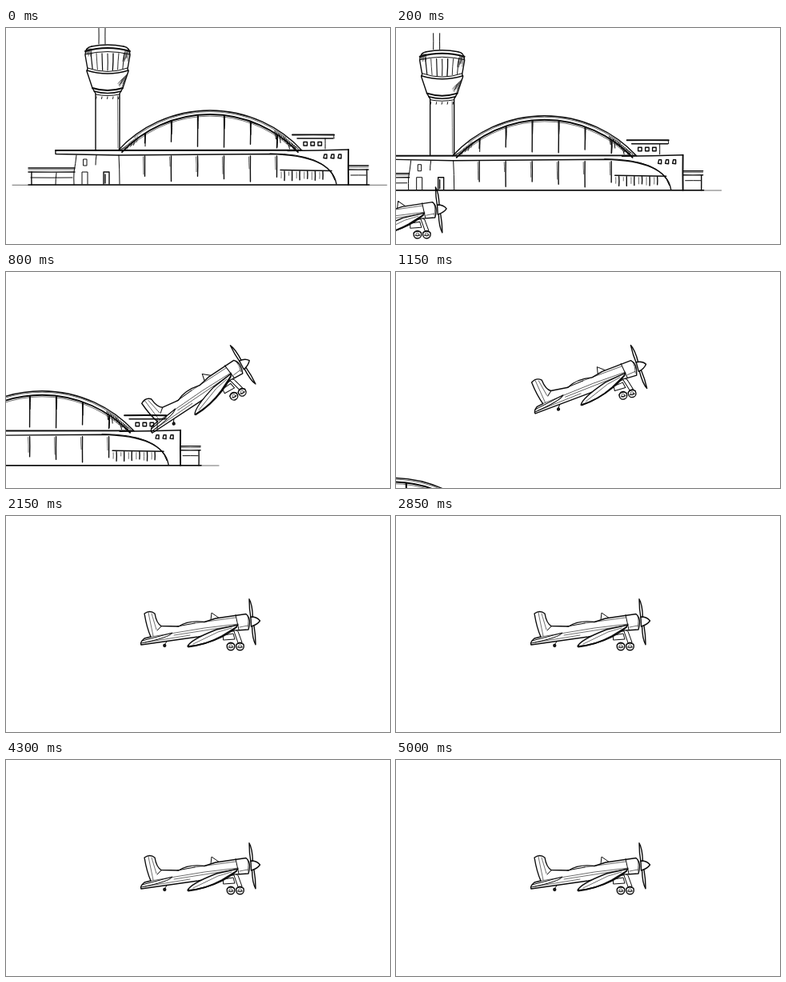
An HTML page that plays this animation: 480 by 270 pixels, repeating every 5.05 s.

```html
<!DOCTYPE html>
<html lang="en">
<head>
<meta charset="utf-8">
<title>Plane taking off</title>
<style>
  html, body { margin: 0; width: 100%; height: 100%; overflow: hidden; background: #fff; }
  svg { display: block; width: 100%; height: 100%; }
  path, circle { fill: none; stroke: #0c0c0c; stroke-linecap: round; stroke-linejoin: round; }
  .skin { fill: #fff; }
  #plane { mix-blend-mode: multiply; }
</style>
</head>
<body>
<svg viewBox="0 0 480 270">
  <g id="airport"></g>
  <g id="plane"></g>
</svg>
<script>
const LOOP = 5050, STEP = 50;
const FINE = 0.6, THIN = 1, MID = 1.4, BOLD = 1.9;
const airport = document.getElementById('airport');
const plane = document.getElementById('plane');

let seed = 7;
function rand(a, b) {
  seed = seed * 16807 % 2147483647;
  return a + (b - a) * seed / 2147483647;
}

function add(parent, tag, attrs) {
  const node = document.createElementNS('http://www.w3.org/2000/svg', tag);
  for (const key in attrs) node.setAttribute(key, attrs[key]);
  parent.append(node);
}
const ink = (d, width = THIN) => add(airport, 'path', { d, 'stroke-width': width });
const draft = (d, width = FINE) => add(plane, 'path', { d, 'stroke-width': width });
const panel = (d, width = MID) => add(plane, 'path', { d, 'stroke-width': width, class: 'skin' });

// A slightly bent hand-drawn line.
function line(x1, y1, x2, y2, width) {
  const mx = (x1 + x2) / 2 + rand(-0.6, 0.6), my = (y1 + y2) / 2 + rand(-0.4, 0.4);
  ink(`M${x1} ${y1}Q${mx} ${my} ${x2} ${y2}`, width);
}

function drawTower() {
  const cx = 127;
  const ring = (y, half, sag, width) => ink(`M${cx - half} ${y}q${half} ${sag} ${2 * half} 0`, width);
  for (const x of [116, 124]) line(x, 0, x, 20);
  for (const side of [-1, 1]) {
    const x = half => cx + side * half;
    ink(`M${x(20)} 23Q${x(28)} 24 ${x(28)} 34L${x(25)} 51L${x(26)} 54L${x(19)} 75L${x(15)} 82V152`, MID);
  }
  ring(23, 20, -4, MID);
  ring(29, 28, -8, BOLD);
  ring(33, 28, -7);
  ring(50, 25, 9);
  ring(53, 26, 8, MID);
  ring(75, 19, 6, BOLD);
  ring(79, 17, 5, MID);
  ring(83, 15, 3);
  for (let k = -3; k <= 3; k++) {
    const x = cx + 7 * k;
    line(x, 32 - k * k / 9, cx + 6.3 * k, 53 - k * k / 4, rand(FINE, MID));
    if (k < 2) line(x + 7, 86, x + 6.5, 88.5);
  }
  for (let i = 0; i < 7; i++) {
    line(154 - i, 27 + rand(0, 5), 152 - i, rand(34, 44), FINE);
    line(151 - i, 58 + i, 146 - i, rand(68, 74), FINE);
    line(101 + i, 26, 101 + i, rand(29, 36), FINE);
  }
  line(139.5, 85, 140, 150, FINE);
}

function drawDome() {
  const cx = 255, top = 103, radius = 157;
  const arch = x => top + radius - Math.sqrt(radius ** 2 - (x - cx) ** 2);
  const arc = (inset, half, width) => {
    const r = radius - inset, y = top + radius - Math.sqrt(r * r - half * half);
    ink(`M${cx - half} ${y}A${r} ${r} 0 0 1 ${cx + half} ${y}`, width);
  };
  arc(0, 115, MID);
  arc(1.5, 95, FINE);
  arc(5, 110, BOLD);
  arc(7, 100, FINE);
  for (let i = 0; i < 6; i++) {
    const x = 173.5 + 33 * i, y = arch(x) + 6;
    line(x, y, x, rand(142, 150), MID);
    line(x + 1, y, x + 0.5, y + 16, THIN);
    line(x, 160, x, rand(184, 195), MID);
    line(x - 2, 161, x - 1.5, rand(170, 184), FINE);
  }
  for (let i = 0; i < 14; i++) {
    const left = 145 + 1.5 * i, right = 336 + 2 * i;
    line(left, arch(left) + 4, left - rand(1, 4), Math.min(151, arch(left) + rand(9, 15)), FINE);
    line(right, arch(right) + 3, right + rand(1, 4), Math.min(151, arch(right) + rand(8, 16)), THIN);
  }
}

function drawCanopy() {
  line(62, 153, 368, 152.7, BOLD);
  line(352, 153.5, 428, 152, MID);
  ink('M62 153V157.500L140 159L330 157.500Q407 159 413 195', MID);
  ink('M330 157Q401 157 411 190');
}

// A low side building: double roof, middle rail, wall.
function drawShed(left, right, roof, wall) {
  line(left, roof, right, roof, MID);
  line(left, roof + 2, right, roof + 2, FINE);
  line(left, roof + 5, right, roof + 5, MID);
  line(left + 3, roof + 12, right - 3, roof + 12);
  line(wall, roof + 5, wall, 196, MID);
}

function drawBlocks() {
  drawShed(28, 86, 175, 32);
  drawShed(428, 453, 172, 451);
  line(63, 181, 62, 196);
  line(88, 159, 85, 180);
  line(85, 180, 85, 196);
  line(113, 159, 112, 171);
  line(141, 159, 142, 195);
  ink('M97 164h4v8h-4zM95 195v-15h7v15');
  ink('M122 195v-15h7v15M124 183v11', MID);

  line(428, 152, 428, 196, BOLD);
  line(358, 133.5, 410, 133.5, BOLD);
  line(364, 138, 409, 138, MID);
  line(410, 133.5, 410, 138);
  line(399, 138, 399, 151);
  for (let i = 0; i < 3; i++) {
    ink(`M${372 + 9 * i} 142.500h4.500v4.500h-4.500z`, MID);
    ink(`M${397 + 9 * i} 162.500l1 -4.500h3v5z`, MID);
  }
  line(343, 177.5, 407, 178.5, MID);
  for (let x = 348; x < 400; x += 9.6) {
    line(x, 179, x, rand(187, 192), MID);
    line(x - 4, 180, x - 4, rand(184, 190), FINE);
  }
}

function drawAirport() {
  line(8, 196.3, 476, 196.3, FINE);
  line(28, 196, 454, 196, MID);
  drawTower();
  drawDome();
  drawCanopy();
  drawBlocks();
}

function drawBody() {
  panel('M256 130L257 121L267 128Z', THIN);
  panel('M173 122Q180 117 186 122Q188 134 194 137.500L216 138Q228 130 248 132.500L262 128L300 122.500Q307 128 303 142L288 143L240 151L169 161Q167 158 173 153L181 151Q176 140 173 122Z');
  draft('M178 121L184 150M182 122L188 142');
  draft('M194 138L189 143M214 138L236 134', THIN);
  draft('M181 151L248 140L290 135M210 149L287 137M236 134L287 127');
  draft('M170 156L208 146Q204 152 169 159', THIN);
  draft('M174 158L230 149');
  draft('M287 123.500Q289 133 291 142', THIN);
  draft('M292 139L302 137M302 125Q304 131 302 139');
}

function drawGear() {
  panel('M272 149L284 147L286 154L272 155Z', THIN);
  panel('M285 143Q290 142 291 147L295 158L291 160Z', THIN);
  for (const x of [281, 292.5]) {
    add(plane, 'circle', { cx: x, cy: 163, r: 4.8, 'stroke-width': MID, class: 'skin' });
    draft(`M${x - 5} 161q5 -4 10 0m-8 3h6`, THIN);
    add(plane, 'circle', { cx: x, cy: 163, r: 2.1, 'stroke-width': FINE });
  }
  draft('M201 157L198 161', THIN);
  add(plane, 'circle', { cx: 198.3, cy: 162, r: 1.2, 'stroke-width': BOLD });
}

function drawWing() {
  panel('M227 163Q230 155 263 142L290 136Q286 143 270 151Q250 161 227 163Z');
  draft('M228 163.500Q250 161 270 150L288 139', BOLD);
  draft('M234 160L265 145L282 140');
}

function drawPropeller() {
  for (const turn of [0, 180]) {
    add(plane, 'path', {
      d: 'M-4 -28.500Q0 -22 0.500 -5H-2Q-4 -16 -4 -28.500Z',
      transform: `translate(308 132.300) rotate(${turn})`,
      'stroke-width': MID, class: 'skin'
    });
  }
  panel('M306 126Q314 126 317.500 131Q314 136 306.500 138Z');
}

// Eased progress from 0 to 1 between two times.
function ease(t, from, to) {
  const u = Math.min(1, Math.max(0, (t - from) / (to - from)));
  return u * u * (3 - 2 * u);
}

function draw(t) {
  const u = t / 400;
  const groundX = -378 * (1 - Math.exp(-t / 987));
  const groundY = 13.4 * u + 0.59 * u ** 5;
  airport.setAttribute('transform', `translate(${groundX} ${groundY})`);

  const x = 243.5 - 339 * Math.max(0, 1 - t / 800);
  const y = 241 - 95.5 * ease(t, 322, 919);
  const pitch = -25.3 * (ease(t, 150, 800) - ease(t, 800, 1500));
  plane.setAttribute('transform', `translate(${x} ${y}) rotate(${pitch}) translate(-243.5 -145.5)`);
}

const start = performance.now();
function tick() {
  const t = (performance.now() - start) % LOOP;
  draw(Math.floor(t / STEP) * STEP);
  requestAnimationFrame(tick);
}

drawAirport();
drawBody();
drawGear();
drawWing();
drawPropeller();
tick();
</script>
</body>
</html>
```
